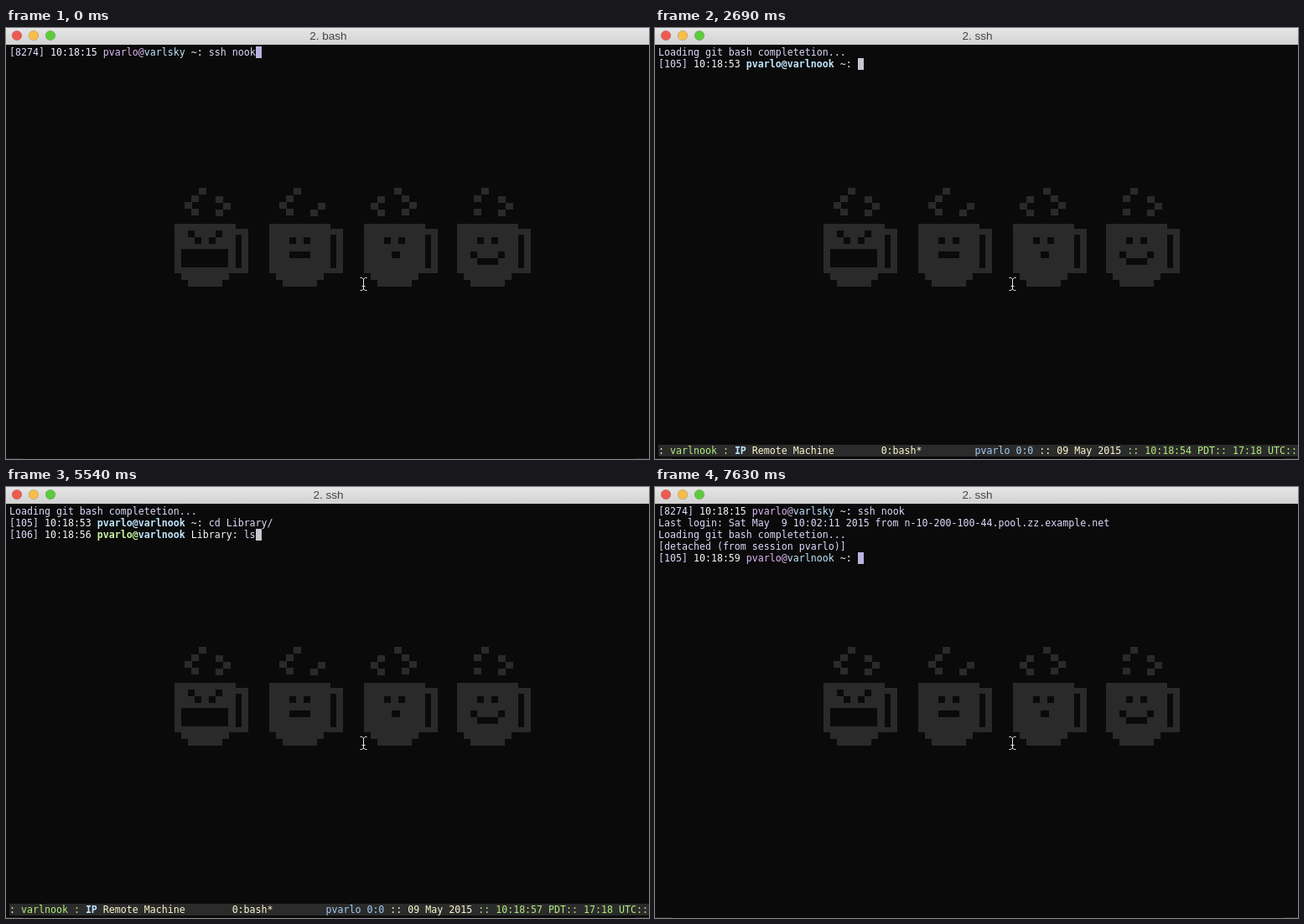
An HTML page that plays this animation: 767x515 px, repeating every 8000 ms.

```html
<!DOCTYPE html>
<html lang="en">
<head>
<meta charset="utf-8">
<title>Terminal session</title>
<style>
html, body { margin: 0; width: 767px; height: 515px; overflow: hidden; background: #0a0a0a; }
svg, pre { position: absolute; left: 0; top: 0; margin: 0; }
pre { left: 4px; font: 11.627px/14px "DejaVu Sans Mono", monospace; color: #dddbfc; white-space: pre; }
#screen { top: 22px; }
#status { top: 498px; width: 763px; height: 14px; background: #2b2b2b; overflow: hidden; }
b { color: #c0e6fd; }
i { display: inline-block; width: 7px; height: 14px; vertical-align: top; background: #b9b4e0; }
.tmux i { background: #c9c5cd; }
.white { color: #f6f5ff; }
.pink { color: #dfb9f4; }
.cyan { color: #c0e6fd; }
.blue { color: #a3cdf7; }
.green { color: #b3ee7c; }
.lime { color: #c9f3a5; }
.cream { color: #fbfad0; }
</style>
</head>
<body>
<svg width="767" height="515">
  <defs>
    <linearGradient id="bar" x2="0" y2="1">
      <stop stop-color="#e6e6e6"/><stop offset="1" stop-color="#d2d2d2"/>
    </linearGradient>
  </defs>
  <g id="mugs"></g>
  <rect width="767" height="20" fill="url(#bar)"/>
  <g stroke-opacity=".15" stroke="#000">
    <circle cx="13" cy="9" r="5.8" fill="#ee5a52"/>
    <circle cx="33" cy="9" r="5.8" fill="#f6bd4b"/>
    <circle cx="53" cy="9" r="5.8" fill="#5dca3d"/>
  </g>
  <text id="title" x="384.5" y="14" text-anchor="middle" fill="#444" font-size="13.5" font-family="Liberation Sans, sans-serif"></text>
  <path d="M0 514.5h20M750 514.5h17" stroke="#222"/>
</svg>
<pre id="screen"></pre>
<pre id="status"></pre>
<svg width="767" height="515" fill="none">
  <path d="M422.5 298.5h2l2 1.500 2-1.500h2M426.500 300v12.500M422.500 313.500h2l2-1.500 2 1.500h2M424.500 308.500h4" stroke="#e8e8e8"/>
</svg>
<script>
const $ = id => document.getElementById(id);

// Mugs are built from cells of about 8 px
const CELL = 8.15, TOP = 234, INK = '#2a2a2a', HOLE = '#0a0a0a';
const rect = (fill, ...box) => {
  const [x, y, w, h] = box.map(Math.round);
  return `<rect x="${x}" y="${y}" width="${w}" height="${h}" fill="${fill}"/>`;
};

// A puff on top, then two wisps that bulge outwards
function steam(left, flip, gap) {
  const puffs = [[29, 191]];
  for (const side of [-1, 1])
    for (const row of [-1, 0, 1])
      puffs.push([34.5 + side * (row ? 14.5 : 23), 208 + row * 8 + (side > 0)]);
  return puffs.filter((_, i) => i !== gap)
    .map(([x, y]) => rect(INK, left + (flip ? 65 - x : x), y, 9, 8)).join('');
}

function mug({ left, flip, gap, face }) {
  const bowl = [0, 1, 2].map(i =>
    rect(INK, left + 8 * i, i ? 285 + 8 * i : TOP, 73 - 16 * i, i ? 8 : 59));
  const handle = rect(INK, left + 73, 240, 15, 53) + rect(HOLE, left + 73, 247, 7, 40);
  const holes = face.map(([col, row, w = 1, h = 1]) =>
    rect(HOLE, left + col * CELL, TOP + row * CELL, w * CELL, h * CELL));
  return steam(left, flip, gap) + bowl.join('') + handle + holes.join('');
}

const eyes = [[3, 2], [5, 2]];
$('mugs').innerHTML = [
  { left: 201, face: [...eyes, [2, 1], [6, 1], [1, 3.7, 6.9, 2.7]] },
  { left: 314, gap: 4, face: [...eyes, [3, 4, 3.1]] },
  { left: 427, flip: true, face: [...eyes, [4, 4, 1.2]] },
  { left: 538, gap: 2, face: [...eyes, [2, 4], [6, 4], [3, 5, 3.1]] }
].map(mug).join('');

const user = 'pvarlo', host = 'varlnook', cursor = '<i></i>';
const span = (cls, text) => `<span class="${cls}">${text}</span>`;

// Shell prompts: plain outside the multiplexer, bold inside it
const plainPrompt = (n, time, machine) =>
  `[${n}] ${span('white', time)} ${span('pink', user + '@')}${span('cyan', machine)} ${span('white', '~:')} `;
const boldPrompt = (n, time, dir, cls) =>
  `[${n}] ${span('white', time)} <b>${span(cls, user + '@')}${host}</b> ${span('white', dir + ':')} `;

const first = plainPrompt(8274, '10:18:15', 'varlsky') + 'ssh nook';
const loading = 'Loading git bash completetion...';
const login = [first, 'Last login: Sat May  9 10:02:11 2015 from n-10-200-100-44.pool.zz.example.net', loading];
const home = boldPrompt(105, '10:18:53', '~', 'cyan');
const library = boldPrompt(106, '10:18:56', 'Library', 'lime');

// Link count, "r" if readable by all, attribute flag, date unless the usual one, name
const listing = `8+ FontCollections
2+ Fonts
3 GameKit
3r Apr 20  2014 Google
10 Apr 19 16:23 Group Containers
5 IdentityServices
3+ Input Methods
3+ Apr 20  2014 Internet Plug-Ins
2+ Keyboard Layouts
7 May  8 23:30 Keychains
3r Nov 23 19:05 LanguageModeling
9 May  9 08:15 LaunchAgents
44 May  9 10:05 Logs
3 Mail
6 Nov 16 10:59 Messages
107r@ Apr 30 21:45 Mobile Documents
4 May  3 11:01 PreferencePanes
180+ May  9 10:16 Preferences
2+ Printers
5 PubSub
3 Dec  6 17:45 Python
23 May  9 00:27 Safari
22 May  9 08:47 Saved Application State
2 Screen Savers
2 Services
2+ Sounds
5 Jun 25  2014 Spelling
13 May  9 10:16 SyncedPreferences
2 Voices
4 WebKit
5r Apr 26 08:32 com.apple.nsurlsessiond
4+ iMovie
3r Aug  6  2014 iTunes`.split('\n').map(line => {
  const [, links, open, flag, date = 'Mar 10  2014 ', name] =
    line.match(/^(\d+)(r?)([+@]?) (\w{3} [ \d]\d [ \d:]{5} )?(.+)/);
  const mode = (open ? 'drwxr–xr–x' : 'drwx––––––') + (flag || ' ');
  const size = String(links * 34).padStart(5);
  return `${mode} ${links.padStart(3)} ${user}  wheel ${size} ${date}<b>${name}</b>`;
});

// Each step: start time, lines on screen (the cursor follows the last one)
const atHome = (t, typed) => [t, [loading, home + typed]];
const atLibrary = (t, typed) => [t, [loading, home + 'cd Library/', library + typed]];
const steps = [
  [0, [first]],
  [750, [first, '']],
  [1490, [...login, '']],
  atHome(1640, ''),
  atHome(3140, 'l'),
  atHome(3740, ''),
  atHome(3890, 'c'),
  atHome(4040, 'cd '),
  atHome(4340, 'cd L'),
  atHome(4490, 'cd Li'),
  atHome(4640, 'cd Lib'),
  atLibrary(5090, ''),
  atLibrary(5240, 'l'),
  atLibrary(5390, 'ls'),
  [5840, [...listing, boldPrompt(107, '10:18:57', 'Library', 'lime')]],
  [7630, [...login, `[detached (from session ${user})]`, plainPrompt(105, '10:18:59', host)]]
];
const ticks = [2690, 3740, 4640, 5540, 6730];

const statusLine = sec =>
  span('cream', ': ') + span('green', host + ' : ') + '<b>IP</b> ' +
  span('cream', 'Remote Machine' + ' '.repeat(8) + '0:bash*' + ' '.repeat(9)) +
  span('blue', user + ' 0:0 ') + span('cream', ':: 09 May 2015 ') +
  span('green', `:: 10:18:${sec} PDT:: 17:18 UTC::`);

const shown = {};
function put(id, html) {
  if (shown[id] !== html) $(id).innerHTML = shown[id] = html;
}

function draw() {
  const t = performance.now() % 8000;
  const tmux = t >= 1640 && t < 7630;
  const [, lines] = steps.findLast(([start]) => start <= t);
  put('title', t < 1350 ? '2. bash' : '2. ssh');
  put('screen', lines.join('\n') + cursor);
  put('status', statusLine(53 + ticks.filter(tick => tick <= t).length));
  $('screen').className = tmux ? 'tmux' : '';
  $('status').style.display = tmux ? '' : 'none';
  requestAnimationFrame(draw);
}
draw();
</script>
</body>
</html>
```
